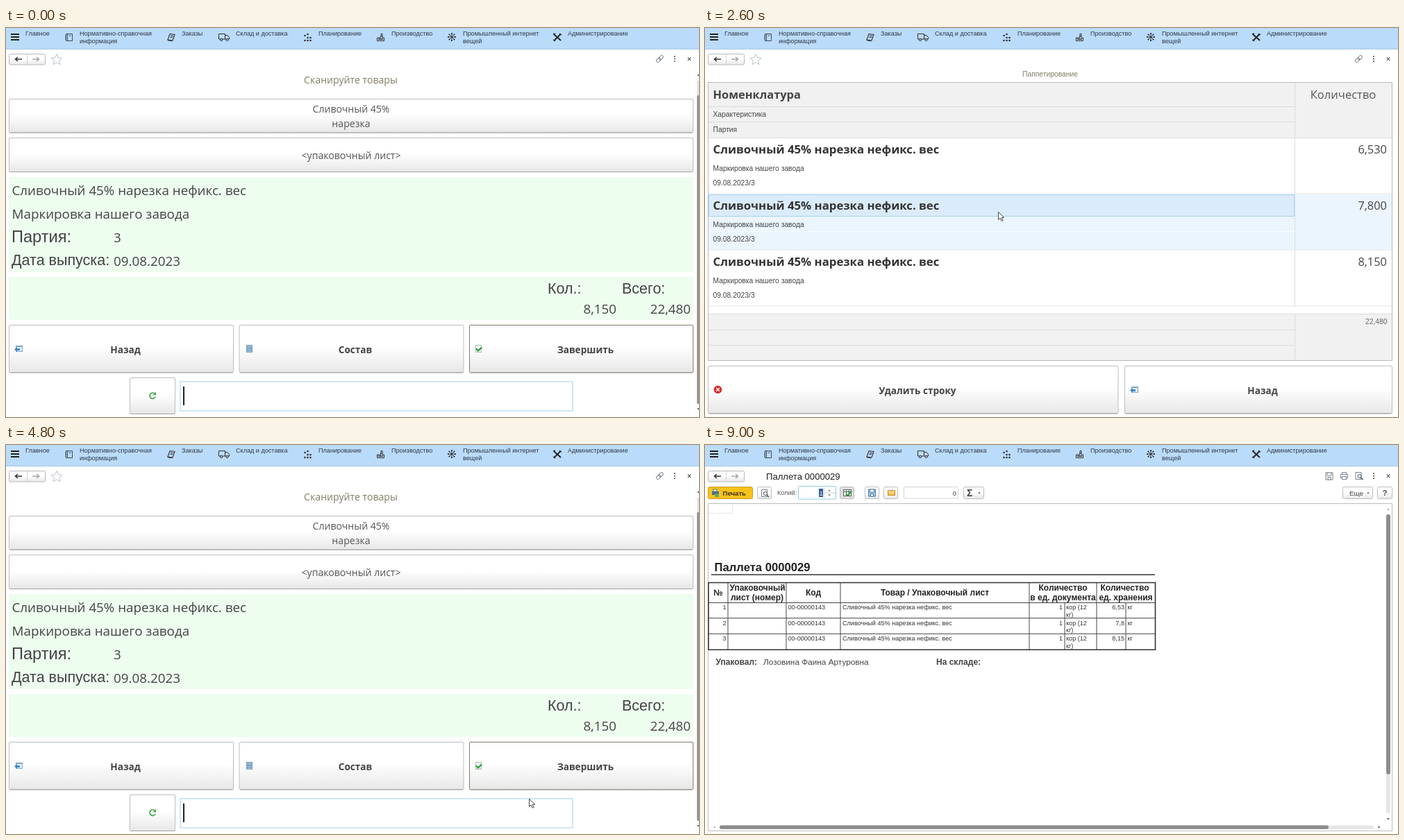
An HTML page that plays this animation: 998x561 px, repeating every 9.2 s.

```html
<!DOCTYPE html>
<html lang="ru">
<head>
<meta charset="utf-8">
<title>Паллетирование</title>
<style>
  html, body { margin: 0; width: 100%; height: 100%; overflow: hidden; background: #fff; }
  svg { display: block; width: 998px; height: 561px; }
  text { font-family: "Liberation Sans", Arial, sans-serif; fill: #444; white-space: pre; }
  .o { font-family: "Open Sans", "Noto Sans", sans-serif; }
  .b { font-weight: 700; }
  .face { fill: url(#face); stroke: #bdbdbd; }
  .ring { fill: none; stroke: #d3e6f3; display: none; }
  .main .face { stroke: #857a66; }
  .focus .ring { display: inline; }
  .focus .face { stroke: #9db0bd; }
  .down .face { fill: #e9e9e9; stroke: #8b979f; }
  .down .label { transform: translateY(1px); }
  #ok.down .face { fill: url(#dark); }
</style>
</head>
<body>
<svg id="stage" viewBox="0 0 998 561" xmlns="http://www.w3.org/2000/svg"></svg>
<script>
const DARK = '#2f2f2f', LINE = '#dcdcdc', OLIVE = '#817d62', GREY = '#7d868d';

const text = (x, y, size, str, { cls = '', at = 'start', fill = '' } = {}) =>
  `<text class="${cls}" x="${x}" y="${y}" font-size="${size}" text-anchor="${at}"` +
  `${fill && ` style="fill:${fill}"`}>${str.replace(/</g, '&lt;')}</text>`;
const rect = (x, y, w, h, fill, stroke = 'none', r = 0) =>
  `<rect x="${x}" y="${y}" width="${w}" height="${h}" rx="${r}" fill="${fill}" stroke="${stroke}"/>`;
const path = (d, stroke = DARK, w = 1, fill = 'none') =>
  `<path d="${d}" stroke="${stroke}" stroke-width="${w}" fill="${fill}"/>`;
const icon = (x, y, body) => `<g transform="translate(${x} ${y})">${body}</g>`;
const group = (id, body) => `<g id="${id}">${body}</g>`;

function button(x, y, w, h, label = '', { id = '', cls = '', mark = '' } = {}) {
  return `<g ${id && `id="${id}"`} class="${cls}" data-base="${cls}">
    <rect class="ring" x="${x - 2}" y="${y - 2}" width="${w + 4}" height="${h + 4}" rx="2"/>
    <rect class="face" x="${x}" y="${y}" width="${w}" height="${h}" rx="1.5"/>
    ${path(`M${x + 1} ${y + h}h${w - 2}`, '#a2a2a2')}${mark}<g class="label">${label}</g></g>`;
}
const bold = (x, y, str) => text(x, y, 13.6, str, { cls: 'o b', at: 'middle' });

const backIcon = (x, y) => icon(x, y,
  rect(2.5, .5, 9, 8, '#e4f1fb', '#7fa5c4') + rect(2, 0, 10, 2, '#7fa5c4') +
  path('M0 5.5l4-3.2v2h4v2.6h-4v2z', 'none', 0, '#3d87bf'));

function header() {
  const items = [
    [28, 'Главное'], [106, 'Нормативно-справочная', 'информация'], [253, 'Заказы'],
    [331, 'Склад и доставка'], [450, 'Планирование'], [555, 'Производство'],
    [658, 'Промышленный интернет', 'вещей'], [809, 'Администрирование']
  ];
  const dots = [[4, 0], [0, 2], [4, 5], [8, 5], [0, 9], [4, 9], [8, 9]]
    .map(([x, y]) => `<circle cx="${x}" cy="${y}" r="1.3" fill="${DARK}"/>`).join('');
  const rays = [...Array(8)].map((_, i) =>
    `<g transform="rotate(${i * 45})">${path('M0-2V-5', DARK, .9)}<circle cy="-5" r=".9"/></g>`).join('');
  const wheel = x => `<circle cx="${x}" cy="9" r="1.6" fill="#badbfa" stroke="${DARK}"/>`;
  return rect(0, 0, 998, 30, '#badbfa') + path('M0 30.5H998', '#a9c8e4') +
    items.map(([x, ...lines]) => lines.map((s, i) => text(x, 11 + 11 * i, 9.1, s, { fill: '#303a44' })).join('')).join('') +
    path('M7 9h12M7 13h12M7 17h12', '#222', 2) +
    icon(85, 8, path('M1.5.5h9v10h-9zM3.5.5v10M0 3h2M0 5.5h2M0 8h2M5.5 3h3', '#3f4a55')) +
    icon(232, 8, path('M4 .5l7 1-3 8.500-7-1z', DARK, 1.1) + path('M5 3l4 .6M4.300 5.200l4 .6M1 8.500l.5 1.500 6 .8', DARK)) +
    icon(306, 8, path('M.5.500h9v7.500h-9zM9.500 2.500h3.500l2.500 3v2.500h-6') + wheel(4) + wheel(12.5)) +
    icon(430.5, 9, dots) +
    icon(534, 8, path('M.5 10.500v-4.500h5v-2h2.500v2h2.500v4.500zM6 4v-3.500h2v3.500', DARK, 1) + path('M2 8h7', DARK, 1.6)) +
    icon(642, 13, rays + `<circle r="1.8" fill="${DARK}"/>`) +
    icon(788, 8, path('M1 1l10 9M10.500 1l-9 9', '#222', 2) + path('M0 1l3-1M9 0l3 2M0 9l3 2', '#222', 1.4)) +
    rect(4.5, 37.5, 52, 15.5, 'url(#face)', '#b9b9b9', 2) + path('M30.5 38v15', '#cfcfcf') +
    path('M23 45H14M17 42l-3.500 3 3.500 3', '#333', 1.6) + path('M38 45h9M44 42l3.500 3-3.500 3', '#a5a5a5', 1.6) +
    [41, 44.5, 48].map(y => `<circle cx="963" cy="${y}" r="1.1" fill="#555"/>`).join('') +
    path('M981.8 42.3l4.5 4.5m0-4.5l-4.5 4.5', '#555', 1.1);
}

const favourite = () =>
  path('M73 37.5l2.300 5.300 5.700.5-4.300 3.800 1.300 5.600-5-3-5 3 1.300-5.600-4.300-3.800 5.700-.5z', '#bcc3c9') +
  `<g transform="translate(941.5 44.5) rotate(-45)">${rect(-6, -2.2, 7, 4.4, 'none', GREY, 2.2)}${rect(-1, -2.2, 7, 4.4, 'none', GREY, 2.2)}</g>`;

function scan() {
  const o = (x, y, s, at) => text(x, y, 18.8, s, { cls: 'o', at });
  const mid = (x, y, s, fill = '#555') => text(x, y, 14.1, s, { cls: 'o', at: 'middle', fill });
  const sheet = icon(346, 457, rect(.5, .5, 8, 10, '#a9c9e2', '#7799b3') + path('M1 3h7M1 5.5h7M1 8h7', '#5d86a5'));
  const done = icon(676, 457, rect(.5, .5, 8, 10, '#f4f8f4', '#a9b8a9') + path('M1 5.5l3 3 5-5', '#2b9a3a', 2.2));
  const reload = path('M214.5 527.5a4.2 4.2 0 1 0 .6 4.5', '#3fa54a', 1.7) + path('M216 525v4.500h-4.500z', 'none', 0, '#3fa54a');
  return favourite() + mid(496.5, 80, 'Сканируйте товары', OLIVE) +
    button(4.5, 102.5, 985, 48.5, mid(497, 122, 'Сливочный 45%') + mid(497, 143, 'нарезка')) +
    button(4.5, 158.5, 985, 49, mid(497, 189, '<упаковочный лист>')) +
    rect(4, 215, 986, 137, '#edfdee') + rect(4, 359, 986, 62, '#edfdee') +
    o(8.5, 240.5, 'Сливочный 45% нарезка нефикс. вес') + o(8.5, 274.5, 'Маркировка нашего завода') +
    text(8, 309, 23.6, 'Партия:') + o(155, 308.5, '3') +
    text(8, 342, 21.5, 'Дата выпуска:') + o(155, 342.5, '09.08.2023') +
    text(780, 382.5, 21.5, 'Кол.:') + text(887, 382.5, 21.5, 'Всего:') +
    o(879, 411.5, '8,150', 'end') + o(986, 411.5, '22,480', 'end') +
    button(4.5, 428.5, 323, 68.5, bold(172, 468.5, 'Назад'), { mark: backIcon(12, 458) }) +
    button(336, 428.5, 323, 68.5, bold(503, 468.5, 'Состав'), { mark: sheet }) +
    button(667.5, 428.5, 322, 68.5, bold(834.5, 468.5, 'Завершить'), { id: 'finish', cls: 'main', mark: done }) +
    button(178.5, 504.5, 65, 52, reload) +
    group('active', rect(251, 510, 565, 42, '#fff', '#9fd0f0') + rect(255, 517, 2, 27, '#222')) +
    group('idle', rect(253, 511.5, 561.5, 39, '#fff', '#b4b4b4', 1)) +
    rect(995, 76, 3, 21, '#e4e4e4') + rect(995, 97, 4, 445, '#969696', 'none', 1.5) +
    path('M995 69l2.5-3 2.5 3zM995 548h4l-2 3z', 'none', 0, '#777');
}

function list() {
  const small = (x, y, s, at, fill) => text(x, y, 10.3, s, { at, fill });
  const rows = ['6,530', '7,800', '8,150'].map((n, i) => `<g transform="translate(0 ${81 * i})">` +
    path('M5 239H989', '#e6e6e6') + text(11.5, 181, 16.8, 'Сливочный 45% нарезка нефикс. вес', { cls: 'o b', fill: '#333' }) +
    small(11.5, 205.5, 'Маркировка нашего завода') + small(11.5, 226.5, '09.08.2023/3') +
    text(982, 181, 16.4, n, { cls: 'o', at: 'end' }) + '</g>').join('');
  const cross = '<circle cx="18.5" cy="521.5" r="5.8" fill="#d8302f"/>' + path('M16.3 519.3l4.4 4.4m0-4.4l-4.4 4.4', '#fff', 1.5);
  return favourite() + small(497, 69.5, 'Паппетирование', 'middle', OLIVE) +
    rect(4.5, 78.5, 985, 401, '#fff', '#b9b9b9') + rect(5, 79, 984, 79, '#f1f1f1') + rect(5, 412, 984, 67, '#f1f1f1') +
    path('M5 113.5H849M5 135.5H849M5 158.5H989M5 412.5H989M5 435.5H849M5 457.5H849', LINE) +
    group('pick', rect(5, 159, 984, 80, '#ebf5fd') + path('M5 212.5H849', '#f8fcff') +
      '<rect id="cell" x="5.5" y="159.5" width="843" height="31" fill="#daecfb"/>') + rows +
    path('M849.5 79V401M849.5 412V479', LINE) +
    text(11.5, 102, 16.4, 'Номенклатура', { cls: 'o b' }) + small(11.5, 127.5, 'Характеристика') + small(11.5, 149.5, 'Партия') +
    text(919, 102, 16.6, 'Количество', { cls: 'o', at: 'middle', fill: '#555' }) + small(982.5, 426.5, '22,480', 'end', '#666') +
    button(4.5, 487.5, 590.5, 68.5, bold(306, 527.5, 'Удалить строку'), { mark: cross }) +
    button(604.5, 487.5, 385, 68.5, bold(803, 527.5, 'Назад'), { id: 'back', mark: backIcon(612, 517) });
}

const info = () =>
  '<circle cx="365" cy="75.5" r="11.5" fill="#f1d09a"/>' +
  '<circle cx="366.3" cy="70" r="1.7" fill="#fff"/>' + path('M363 74h2.8l-1.6 7h2.5', '#fff', 2) +
  text(518, 279.5, 12.8, 'Заполнен документ Паллета 0000029', { cls: 'o', at: 'middle' }) +
  button(4.5, 516, 985, 40, path('M486.5 537l6.5 6 14-14', '#444', 4.2), { id: 'ok' });

function print() {
  const head = (x, y, s) => text(x, y, 12, s, { cls: 'b', at: 'middle', fill: '#222' });
  const cell = (x, y, s, at) => text(x, y, 9.1, s, { at, fill: '#333' });
  const tool = (x, w, body) => rect(x + .5, 60.5, w, 17, 'url(#face)', '#bcbcbc', 2) + body;
  const lens = (x, y) => icon(x, y, rect(.5, .5, 8, 10, '#fff', GREY) + '<circle cx="6" cy="6" r="2.6" fill="#fff" stroke="#456"/>' + path('M8 8l3 3', '#456', 1.5));
  const disk = (x, y, c, f) => icon(x, y, rect(.5, .5, 10, 10, f, c) + rect(2.5, .5, 6, 4, '#fff', c) + rect(3.5, 7, 4, 3.5, '#fff', c));
  const rows = ['6,53', '7,8', '8,15'].map((n, i) => {
    const y = 237 + 22.5 * i;
    return cell(30.5, y, `${i + 1}`, 'end') + cell(119.5, y, '00-00000143') + cell(198, y, 'Сливочный 45% нарезка нефикс. вес') +
      cell(515, y, '1', 'end') + cell(520, y, 'кор (12') + cell(520, y + 10.5, 'кг)') + cell(604, y, n, 'end') + cell(608.5, y, 'кг');
  }).join('');
  return text(88, 49.5, 13.1, 'Паллета 0000029', { fill: '#222' }) +
    disk(893.5, 39.5, GREY, '#fff') +
    icon(915, 39, rect(.5, 3.5, 10, 5, '#fff', GREY) + rect(2.5, .5, 6, 3, '#fff', GREY) + rect(2.5, 6.5, 6, 4, '#fff', GREY)) + lens(936.5, 39) +
    rect(4.5, 60.5, 64, 17, '#f8c21b', '#c99c20', 2) +
    icon(9, 64, rect(1, 3, 10, 5, '#496f8a') + rect(3, 0, 5, 3, '#fff', '#496f8a') + rect(5, 6, 6, 5, '#5fa765')) +
    text(25.5, 72.5, 9.6, 'Печать', { cls: 'b', fill: '#3e3518' }) +
    tool(75, 20, lens(81, 64)) + text(104, 72, 9.2, 'Копий:', { fill: '#555' }) +
    rect(134.5, 59.5, 54, 18.5, '#fff', '#8fc8ec', 1) + rect(164, 63, 6, 12, '#315f9b') + text(164.5, 72.5, 9.4, '1', { fill: '#fff' }) +
    path('M171.5 61v16M172 69h16', '#d2d2d2') + path('M177 66.5h4l-2-2zM177 71.5h4l-2 2z', 'none', 0, '#666') +
    tool(194, 20, rect(195, 61, 19, 16, '#dedede') + icon(199, 64, rect(.5, .5, 11, 9, '#e7f4e8', '#59695f') + path('M1 3.5h11M4.5 1v9M8 1v9', '#59695f') + path('M4 7l3 2 5-7', '#2c8c3b', 1.8))) +
    tool(230, 20, disk(235, 63.5, '#4b7ba3', '#a7cae8')) +
    tool(257, 20, icon(263, 65, rect(.5, .5, 10, 7, '#f5bf51', '#c98f2b') + path('M1 1l4.5 4 4.5-4', '#fff'))) +
    rect(286.5, 60.5, 78, 16.5, '#fff', '#d4d4d4', 1) + text(362, 72.5, 9.4, '0', { at: 'end' }) +
    tool(372, 29, text(377, 74, 14, 'Σ', { cls: 'b' }) + path('M393 68.5h4l-2 2z', 'none', 0, '#555')) +
    tool(918, 43, text(928, 72.5, 9.8, 'Еще') + path('M953 68.5h4l-2 2z', 'none', 0, '#555')) +
    tool(968, 21, text(979, 73, 11, '?', { cls: 'b', at: 'middle' })) +
    rect(4.5, 84.5, 985, 472, '#fff', '#bcbcbc') + path('M5 98.5H39.5V85', '#e8e8e8') +
    text(13.5, 182, 16.65, 'Паллета 0000029', { cls: 'b', fill: '#222' }) + path('M9 187H648', '#333', 1.6) +
    path('M33 198V295M117 198V295M195 198V295M467 198V295M564 198V295M518 227V295M606 227V295M5 227.5H649M5 249.7H649M5 272.3H649', '#444', 1) +
    path('M5 198.5H648.5V295.3H5z', '#333', 1.6) +
    head(19, 217, '№') + head(75.5, 210, 'Упаковочный') + head(75, 223.5, 'лист (номер)') + head(156, 217, 'Код') +
    head(331, 217, 'Товар / Упаковочный лист') + head(515.5, 210, 'Количество') + head(515.5, 223.5, 'в ед. документа') +
    head(604.5, 210, 'Количество') + head(606, 223.5, 'ед. хранения') + rows +
    text(15.5, 316.5, 12, 'Упаковал:', { cls: 'b' }) + text(84, 316.5, 11.8, 'Лозовина Фаина Артуровна') +
    text(333, 316.5, 12, 'На складе:', { cls: 'b' }) +
    rect(981, 100, 6, 431, '#e6e6e6', 'none', 3) + rect(981, 100, 6, 375, '#8d8d8d', 'none', 3) +
    rect(21, 548.5, 942, 5.5, '#e6e6e6', 'none', 2.7) + rect(21, 548.5, 877, 5.5, '#8d8d8d', 'none', 2.7) +
    path('M982 94h4l-2-3zM14.5 549v4l-3-2z', 'none', 0, '#bbb') + path('M982 538h4l-2 3zM969.5 549v4l3-2z', 'none', 0, '#666');
}

const stage = document.getElementById('stage');
stage.innerHTML = `<defs>
  <linearGradient id="face" x2="0" y2="1"><stop offset=".45" stop-color="#fff"/><stop offset="1" stop-color="#e7e7e7"/></linearGradient>
  <linearGradient id="dark" x2="0" y2="1"><stop offset="0" stop-color="#e9e9e9"/><stop offset="1" stop-color="#cfcfcf"/></linearGradient>
  </defs>` + header() + group('scan', scan()) + group('list', list()) + group('info', info()) + group('print', print()) +
  group('mouse', path('M.5.5V11.5l2.600-2.400 2 4.300 2-.9-2-4.200h3.600z', '#444', 1, '#fff'));

const $ = id => document.getElementById(id);
const show = (id, on) => $(id).setAttribute('display', on ? 'inline' : 'none');
const setButton = (id, focus, down) =>
  $(id).setAttribute('class', `${$(id).dataset.base}${focus ? ' focus' : ''}${down ? ' down' : ''}`);

// Each table row: start time in ms, then the values held until the next row.
const LOOP = 9200;
const at = (table, t) => table.reduce((cur, row) => (row[0] <= t ? row : cur));
const scenes = [[0, 'scan'], [1400, 'list'], [4800, 'scan'], [6200, 'info'], [7800, 'print']];
const picks = [[0, 0], [2600, 1], [3200, 2]];
const mouse = [
  [0], [400, 161, 214], [600, 262, 297], [800, 402, 406], [1000, 486, 451],
  [2000, 448, 334], [2200, 422, 265], [3000, 423, 305], [3200, 424, 334],
  [4000, 530, 392], [4200, 680, 474], [4400, 753, 510],
  [5000, 754, 502], [5200, 756, 490], [5400, 759, 475], [5600, 762, 460], [5800, 763, 453],
  [7000, 694, 480], [7200, 606, 512], [7400, 567, 522], [8000, 564, 515],
  [8600, 470, 434], [8800, 323, 306], [9000]
];

function draw(t) {
  const scene = at(scenes, t)[1];
  for (const id of ['scan', 'list', 'info', 'print']) show(id, id === scene);
  $('pick').setAttribute('transform', `translate(0 ${81 * at(picks, t)[1]})`);
  $('cell').setAttribute('stroke', t < 4400 ? '#a6d2f1' : 'none');
  setButton('back', t >= 4400, t >= 4400 && t < 4600);
  const finishing = t >= 6000;
  setButton('finish', finishing, finishing);
  show('active', !finishing);
  show('idle', finishing);
  setButton('ok', true, t >= 7400 && t < 7600);
  const [, x, y] = at(mouse, t);
  show('mouse', x !== undefined);
  if (x !== undefined) $('mouse').setAttribute('transform', `translate(${x} ${y})`);
}

const start = performance.now();
function tick() {
  draw((performance.now() - start) % LOOP);
  requestAnimationFrame(tick);
}
tick();
</script>
</body>
</html>
```
